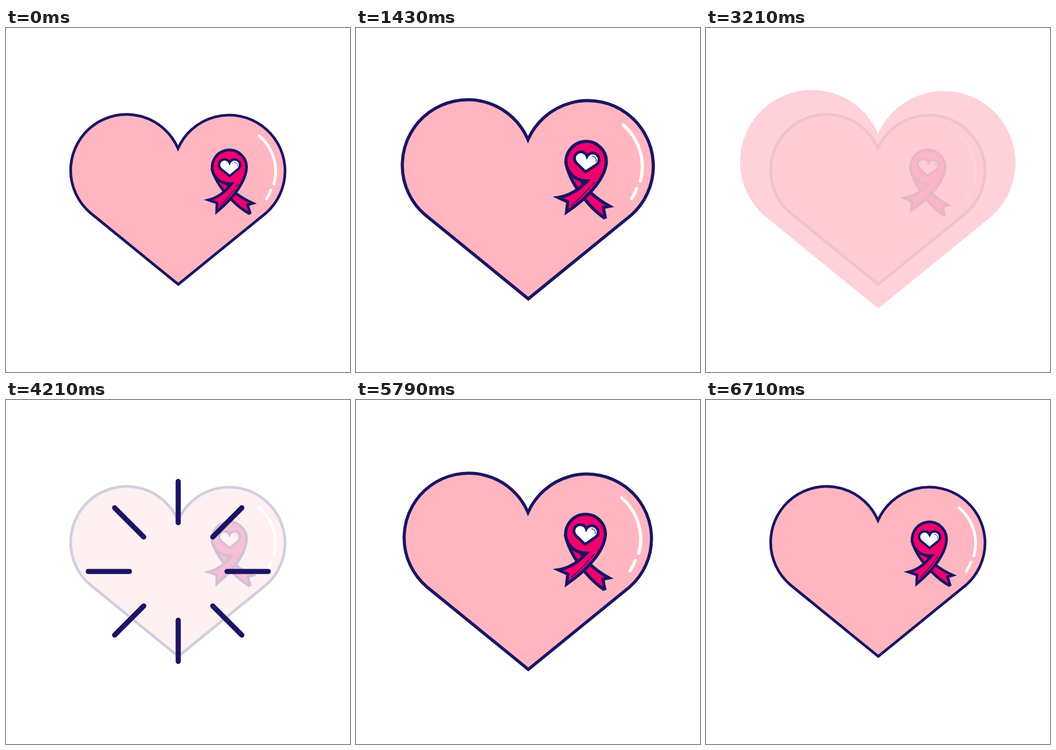
Write an HTML page that moves like this. It is 640 px wide and 640 px high and loops after 6.93 s.

```html
<!DOCTYPE html>
<html lang="en">
<head>
<meta charset="utf-8">
<title>Beating heart</title>
<style>
  html, body { margin: 0; width: 100%; height: 100%; overflow: hidden; background: #fff; }
  svg { display: block; width: 100%; height: 100%; }
  .line { fill: none; stroke: #1b1464; stroke-linecap: round; }
  .band { fill: #f0006e; stroke: #1b1464; stroke-width: 5; }
  .shine { fill: none; stroke: #fff; stroke-width: 5; stroke-linecap: round; }
</style>
</head>
<body>
<svg viewBox="0 0 640 640">
  <defs>
    <path id="shape" d="M320 224 A104 104 0 1 0 157 344 L320.5 477 L484 344 A104 104 0 1 0 320 224 Z"/>
  </defs>
  <g id="body">
    <g id="heart">
      <use href="#shape" fill="#ffb6c1" stroke="#1b1464" stroke-width="5"/>
      <path class="shine" d="M471 200.5 A87.5 87.5 0 0 1 498.5 290 M493 301.5 Q490 310 484.5 318"/>
    </g>
    <g id="ribbon">
      <path class="band" d="M385 268 Q393 292 419 319 Q436 336 452 345 L454 344 L449.5 329 L459.5 326 Q441 318 427 307 Q410 290 400 278 Z"/>
      <path class="band" d="M385.5 270 A32 32 0 1 1 447.5 258 C447.5 283 425 315 392 342 L392.5 325.5 L376.5 320 Q401 314 420 289.5 Q396 291 385.5 270 Z"/>
      <path class="line" stroke-width="1.2" d="M432 290 L427.5 296.500 M425 299.500 Q413 316 398 331"/>
      <use href="#shape" transform="translate(416 260) scale(.098) translate(-320 -320)" fill="#fff" stroke="#1b1464" stroke-width="45"/>
      <path class="line" stroke-width="1" d="M424.500 249.500 A6.500 6.500 0 0 1 431 257.500"/>
    </g>
  </g>
  <use id="ghost" href="#shape" fill="#ffb6c1"/>
  <path id="rays" class="line" stroke-width="9.6"/>
</svg>
<script>
const LOOP = 6930, FRAME = 1000 / 14;
const [bodyEl, heart, ribbon, ghost, rays] =
  ['body', 'heart', 'ribbon', 'ghost', 'rays'].map(id => document.getElementById(id));

const part = (t, from, to) => Math.min(1, Math.max(0, (t - from) / (to - from)));
const smooth = u => u * u * (3 - 2 * u);
const easeOut = u => 1 - (1 - u) ** 3;

// One swell: slow rise, quicker fall.
const swell = t => smooth(part(t, 388, 1190)) - smooth(part(t, 1190, 1700));
const visible = (t, lag) => 1 - part(t, 3005 + lag, 3255 + lag) + part(t, 4164, 4414);
const zoom = s => `translate(320 320) scale(${s}) translate(-320 -320)`;

function ghostPose(t) {
  if (t < 3400) {
    return [0.5 + part(t, 2610, 3380), part(t, 2640, 2890) - part(t, 3122, 3370)];
  }
  const grow = smooth(part(t, 3400, 3760)) - smooth(part(t, 3760, 4130));
  return [0.81 * grow, grow > 0 ? 1 : 0];
}

function rayPath(t) {
  const inner = 275 * easeOut(part(t, 4148, 4678));
  const outer = 275 * easeOut(part(t, 4072, 4602));
  if (outer - inner < 0.5) return '';
  let d = '';
  for (let i = 0; i < 8; i++) {
    const x = Math.cos(i * Math.PI / 4), y = Math.sin(i * Math.PI / 4);
    d += `M${320.4 + x * inner} ${319 + y * inner}L${320.4 + x * outer} ${319 + y * outer}`;
  }
  return d;
}

function draw(t) {
  const beat = swell(t) + swell(t - 5000);
  const swing = beat + swell(t - 2420);
  bodyEl.setAttribute('transform', zoom(1 + 0.312 * beat));
  ribbon.setAttribute('transform', `rotate(${10 * swing} 414 227)`);
  heart.setAttribute('opacity', visible(t, 0));
  ribbon.setAttribute('opacity', visible(t, 20));
  const [size, alpha] = ghostPose(t);
  ghost.setAttribute('transform', zoom(size));
  ghost.setAttribute('opacity', alpha);
  rays.setAttribute('d', rayPath(t));
}

const start = performance.now();
function tick() {
  const t = (performance.now() - start) % LOOP;
  draw(Math.min(96, Math.floor((t + 5) / FRAME)) * FRAME);
  requestAnimationFrame(tick);
}
tick();
</script>
</body>
</html>
```
